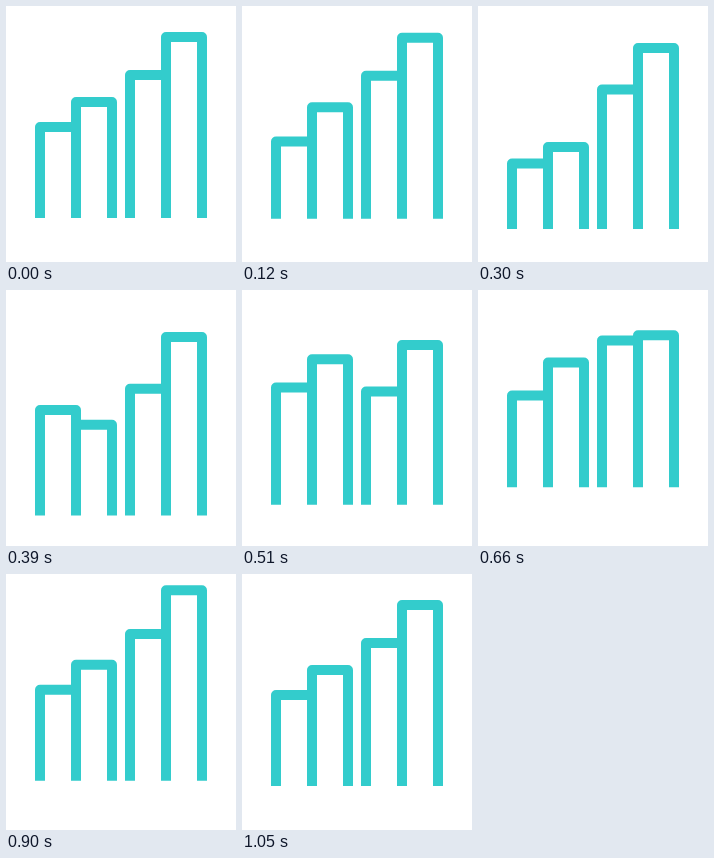
An HTML page that plays this animation: 230 px wide and 256 px high, repeating every 1230 ms.

```html
<!DOCTYPE html>
<html lang="en">
<head>
<meta charset="utf-8">
<title>Bouncing bars</title>
<style>
  html, body { margin: 0; width: 100%; height: 100%; overflow: hidden; background: #fff; }
  svg { display: block; width: 230px; height: 256px; }
  path { fill: none; stroke: #3cc; stroke-width: 10; stroke-linejoin: round; }
</style>
</head>
<body>
<svg viewBox="0 0 230 256"><path id="chart"/></svg>
<script>
const LOOP = 1230, STEP = 30, BASE = 212, WIDTH = 36;
const chart = document.getElementById('chart');
const bars = [
  { height: 91, dip: 36, rise: 30 },
  { height: 116, dip: 36, rise: 30 },
  { height: 143, dip: 30, rise: 20 },
  { height: 181, dip: 33, rise: 16 }
];

// Sine ease from 0 to 1 between two times, held outside them.
function ease(t, from, to) {
  const u = Math.min(1, Math.max(0, (t - from) / (to - from)));
  return (1 - Math.cos(Math.PI * u)) / 2;
}

// Leaves rest, reaches -dip at low and +rise at peak, then settles.
function bounce(t, { start, low, peak, end, dip, rise }) {
  return -dip * ease(t, start, low)
    + (dip + rise) * ease(t, low, peak)
    - rise * ease(t, peak, end);
}

const sway = { start: 68, low: 390, peak: 675, end: 1050, dip: 13.5, rise: 15 };

// Bars stand in two pairs; each pair, and each bar within it, follows with a delay.
bars.forEach((bar, i) => {
  const pair = i >> 1, side = i % 2;
  bar.x = 34 + WIDTH * i + 18 * pair;
  bar.low = 243 + 284 * pair + 101 * side;
  bar.start = Math.max(STEP, bar.low - 290);
  bar.peak = bar.low + (side ? 175 : 217);
  bar.end = bar.peak + 220;
});

function draw(now) {
  const t = Math.floor((now % LOOP) / STEP) * STEP;
  const bottom = BASE - bounce(t, sway);
  chart.setAttribute('d', bars.map(bar => {
    const top = bottom - bar.height - bounce(t, bar);
    return `M${bar.x} ${bottom}V${top}h${WIDTH}V${bottom}`;
  }).join(''));
}

const start = performance.now();
function tick() {
  draw(performance.now() - start);
  requestAnimationFrame(tick);
}
tick();
</script>
</body>
</html>
```
